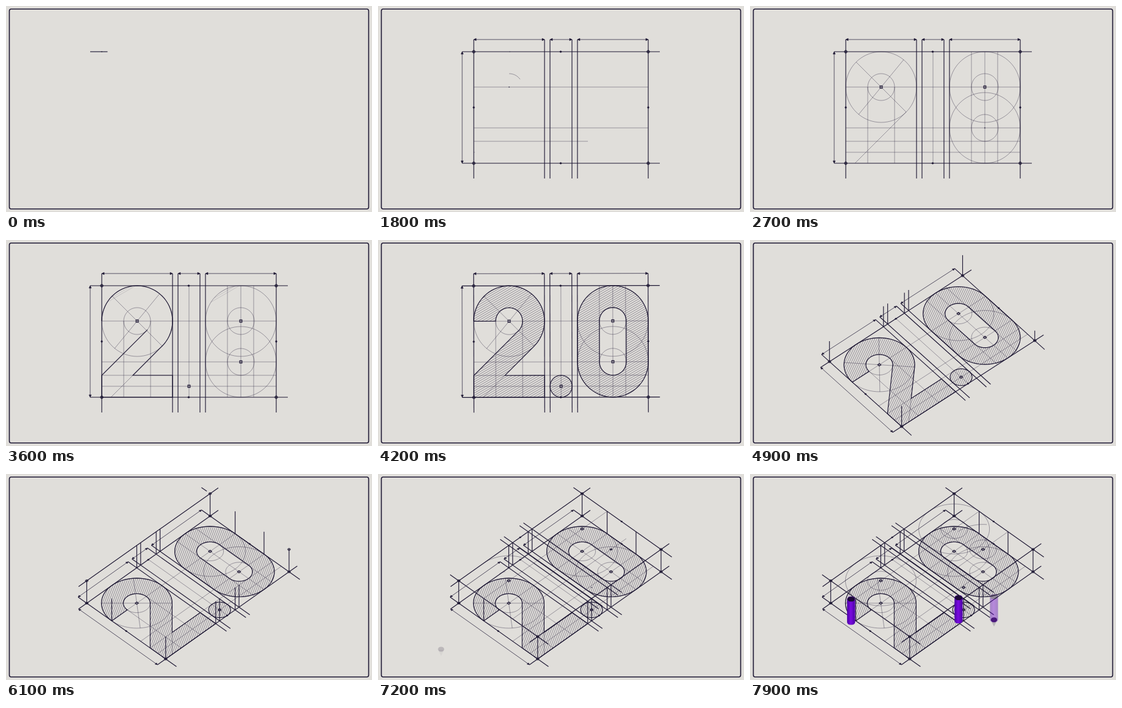
Animation, 600 px wide and 338 px high, one loop 8 s. Source, as an HTML page:

```html
<!DOCTYPE html>
<html lang="en">
<head>
<meta charset="utf-8">
<title>Blueprint 2.0</title>
<style>
  html, body { margin: 0; width: 100%; height: 100%; overflow: hidden; background: #e0deda; }
  svg { display: block; width: 100vw; height: 100vh; }
  path { fill: none; stroke: #1d1733; }
  .bold { stroke-width: 1.15; }
  .thin { stroke-width: .8; stroke-opacity: .48; }
  .dim { stroke-width: .85; stroke-opacity: .85; }
  .solid { fill: #1d1733; stroke-width: .5; }
  .ring { fill: #1d1733; fill-opacity: .6; stroke-width: 1; }
  .square { fill: #9b97a0; stroke-width: 1.15; }
  .hatch { stroke-width: .7; stroke-opacity: .6; vector-effect: non-scaling-stroke; }
</style>
</head>
<body>
<svg viewBox="0 0 600 338">
  <defs>
    <linearGradient id="tube">
      <stop offset="0" stop-color="#4a00a4"/>
      <stop offset=".45" stop-color="#7a0be0"/>
      <stop offset="1" stop-color="#4d00a8"/>
    </linearGradient>
  </defs>
  <rect x="5.5" y="5" width="589" height="328" rx="3" fill="none" stroke="#1d1733" stroke-width="1.6"/>
  <g id="thin"></g>
  <g id="hatch"></g>
  <g id="ink"></g>
  <g id="tubes"></g>
</svg>
<script>
const LOOP = 8000, HEIGHT = 52, RAD = Math.PI / 180;
const LEFT = 157, RIGHT = 443, TOP = 75, BOTTOM = 258;
const COLUMNS = [273, 282, 318, 327];
const layers = Object.fromEntries(['thin', 'hatch', 'ink', 'tubes'].map(id => [id, document.getElementById(id)]));

const clamp = v => Math.max(0, Math.min(1, v));
const ease = p => p < .5 ? 4 * p ** 3 : 1 - 4 * (1 - p) ** 3;
const progress = (t, start, dur) => ease(clamp((t - start) / dur));

function add(parent, tag, attrs) {
  const el = document.createElementNS('http://www.w3.org/2000/svg', tag);
  for (const key in attrs) el.setAttribute(key, attrs[key]);
  return parent.appendChild(el);
}

// Camera: turns about the vertical axis and tilts by the same angle.
let view;
function setView(t) {
  const p = progress(t, 4100, 1140), a = 45 * RAD * p;
  view = { c: Math.cos(a), s: Math.sin(a), cx: 300 - 1.8 * p * p, cy: 166.5 + 19.7 * p * p };
}
function project([x, y], z = 0) {
  const { c, s, cx, cy } = view, dx = x - 300, dy = y - 166.5;
  return [cx + c * dx + s * dy, cy + c * (c * dy - s * dx) - s * z];
}
function groundMatrix() {
  const { c, s, cx, cy } = view, d = c * c, b = -c * s;
  return `matrix(${c} ${b} ${s} ${d} ${cx - 300 * c - 166.5 * s} ${cy - 300 * b - 166.5 * d})`;
}
const toPath = pts => pts.length ? 'M' + pts.map(p => p.map(v => v.toFixed(2)).join(' ')).join('L') : '';

// Angles in degrees, 0 to the right, clockwise positive.
function arc(x, y, r, from, to) {
  const n = Math.ceil(Math.abs(to - from) / 5);
  return Array.from({ length: n + 1 }, (_, i) => {
    const a = (from + (to - from) * i / n) * RAD;
    return [x + r * Math.cos(a), y + r * Math.sin(a)];
  });
}
const circle = (x, y, r) => arc(x, y, r, -90, 270);
const row = (y, from = LEFT, to = RIGHT) => [[from, y], [to, y]];
const column = (x, from = TOP, to = BOTTOM) => [[x, from], [x, to]];
const stadium = r => [...arc(385, 133, r, -180, 0), ...arc(385, 200, r, 0, 180), [385 - r, 133]];

function partial(pts, p) {
  if (p <= 0) return [];
  if (p >= 1) return pts;
  const lengths = pts.slice(1).map((q, i) => Math.hypot(q[0] - pts[i][0], q[1] - pts[i][1]));
  let left = p * lengths.reduce((a, b) => a + b, 0);
  const out = [pts[0]];
  for (let i = 0; i < lengths.length; i++) {
    const k = lengths[i] ? Math.min(1, left / lengths[i]) : 1, a = pts[i], b = pts[i + 1];
    out.push([a[0] + (b[0] - a[0]) * k, a[1] + (b[1] - a[1]) * k]);
    left -= lengths[i];
    if (left <= 0) break;
  }
  return out;
}

const updates = [];
function stroke(cls, pts, start, dur = 450, z = 0) {
  const el = add(layers[cls === 'thin' ? 'thin' : 'ink'], 'path', { class: cls });
  updates.push(t => el.setAttribute('d', toPath(partial(pts, progress(t, start, dur)).map(p => project(p, z)))));
}
function mark(cls, x, y, shape, start, z = 0) {
  const el = add(layers.ink, 'path', { class: cls });
  updates.push(t => {
    const k = progress(t, start, 250);
    const pts = k ? shape.map(([dx, dy]) => project([x + dx * k, y + dy * k], z)) : [];
    el.setAttribute('d', pts.length ? toPath(pts) + 'Z' : '');
  });
}
function post(x, y, start, dur = 350) {
  const el = add(layers.ink, 'path', { class: 'bold' });
  updates.push(t => {
    const k = progress(t, start, dur);
    el.setAttribute('d', k ? toPath([project([x, y]), project([x, y], HEIGHT * k)]) : '');
  });
}
const dot = r => circle(0, 0, r);
const box = r => [[-r, -r], [r, -r], [r, r], [-r, r]];

function dimension(a, b, start) {
  stroke('dim', [a, b], start);
  const len = Math.hypot(b[0] - a[0], b[1] - a[1]), ux = (b[0] - a[0]) / len, uy = (b[1] - a[1]) / len;
  const head = s => [[0, 0], [s * ux * 4 - uy * 2, s * uy * 4 + ux * 2], [s * ux * 4 + uy * 2, s * uy * 4 - ux * 2]];
  mark('solid', ...a, head(1), start);
  mark('solid', ...b, head(-1), start + 250);
}

// Main frame
stroke('bold', row(TOP, 138, 462), -139, 500);
stroke('bold', column(LEFT, 55, 283), 100);
stroke('bold', column(RIGHT, 55, 283), 300);
stroke('bold', row(BOTTOM, 138, 462), 380);
COLUMNS.forEach((x, i) => stroke('bold', column(x, 55, 283), 420 + 70 * i));
[[LEFT, TOP, -70], [RIGHT, TOP, 250], [LEFT, BOTTOM, 450], [RIGHT, BOTTOM, 650]]
  .forEach(([x, y, t]) => mark('ring', x, y, dot(2.3), t));
[[299.5, TOP], [299.5, BOTTOM], [LEFT, 166.5], [RIGHT, 166.5]]
  .forEach(([x, y], i) => mark('solid', x, y, dot(1.4), 700 + 60 * i));

dimension([138, TOP], [138, BOTTOM], 850);
dimension([LEFT, 55], [273, 55], 950);
dimension([282, 55], [318, 55], 1050);
dimension([327, 55], [RIGHT, 55], 1150);

// Construction lines
[[133, 1150], [200, 1350], [222, 1550], [240, 1750]].forEach(([y, t]) => stroke('thin', row(y), t));
[[215, 133, 22], [215, 133, 58], [385, 133, 22], [385, 133, 58], [385, 200, 22], [385, 200, 58]]
  .forEach(([x, y, r], i) => stroke('thin', circle(x, y, r), 1650 + 100 * i));
stroke('thin', column(193, 133), 1950);
stroke('thin', column(237, 133), 2000);
[300, 363, 385, 406].forEach((x, i) => stroke('thin', column(x), 2000 + 70 * i));
stroke('thin', [[174, 92], [256, 174]], 2150);
stroke('thin', [[252, 88], [178, 178]], 2220);
stroke('thin', [[256, 174], [172, 258]], 2280);

[[215, 133, 1750], [385, 133, 2500], [385, 200, 2650], [300, 240, 2800]]
  .forEach(([x, y, t]) => mark('square', x, y, box(1.9), t));

// Glyph outlines and hatching
const two = [
  ...arc(215, 133, 58, -180, 45), [208, 222], [273, 222], [273, 258], [157, 258], [157, 222],
  ...arc(215, 133, 22, 45, -180), [157, 133]
];
const point = circle(300, 240, 18);
stroke('bold', two, 2900, 1060);
stroke('bold', stadium(58), 3600, 550);
stroke('bold', stadium(22), 3620, 500);
stroke('bold', point, 3650, 450);

function hatch(id, outlines, x0, y0, span, start, dur) {
  const group = add(layers.hatch, 'g');
  const clip = add(group, 'clipPath', { id });
  add(clip, 'path', { d: outlines.map(o => toPath(o) + 'Z').join(''), 'clip-rule': 'evenodd' });
  const lines = add(group, 'path', { class: 'hatch', 'clip-path': `url(#${id})` });
  updates.push(t => {
    group.setAttribute('transform', groundMatrix());
    group.setAttribute('opacity', clamp(1.6 * (t - start) / dur));
    const limit = span * progress(t, start, dur);
    let d = '';
    for (let u = 0; u < limit; u += 3.2) {
      const x = x0 + u * .5, y = y0 + u * .866;
      d += toPath([[x - 173.2, y + 100], [x + 173.2, y - 100]]);
    }
    lines.setAttribute('d', d);
  });
}
hatch('hatchTwo', [two], 186, 83, 205, 3450, 700);
hatch('hatchZero', [stadium(58), stadium(22)], 356, 83, 180, 3450, 700);
hatch('hatchPoint', [point], 291, 224.4, 37, 3700, 430);

// Posts joining the two planes
post(LEFT, TOP, 4520);
post(RIGHT, TOP, 4550);
post(LEFT, BOTTOM, 4550);
COLUMNS.forEach(x => post(x, TOP, 4540));
post(RIGHT, BOTTOM, 4728);
post(RIGHT, 133, 5300);
post(RIGHT, 200, 5400);
post(LEFT, 133, 5450);
COLUMNS.forEach((x, i) => post(x, BOTTOM, 5500 + 50 * i));

// Upper plane
const upper = (cls, pts, start, dur = 550) => stroke(cls, pts, start, dur, HEIGHT);
upper('bold', row(TOP, 138, 462), 5450, 550);
upper('bold', column(RIGHT, 55, 283), 5970);
upper('bold', row(BOTTOM, 138, 462), 6300);
upper('bold', column(LEFT, 55, 283), 6400);
COLUMNS.forEach((x, i) => upper('bold', column(x, 55, 283), 6500 + 60 * i));
[[133, 6700], [200, 6800]].forEach(([y, t]) => upper('thin', row(y), t));
[[215, 133, 58, 7000], [215, 133, 22, 7050], [385, 133, 58, 7250], [385, 133, 22, 7200], [385, 200, 22, 7350], [385, 200, 58, 7720]]
  .forEach(([x, y, r, t]) => upper('thin', circle(x, y, r), t));
[[LEFT, TOP, 5550], [RIGHT, TOP, 5800], [RIGHT, BOTTOM, 5850], [LEFT, BOTTOM, 6500]]
  .forEach(([x, y, t]) => mark('ring', x, y, dot(2.3), t, HEIGHT));
[[299.5, TOP, 6450], [RIGHT, 166.5, 6500]].forEach(([x, y, t]) => mark('solid', x, y, dot(1.4), t, HEIGHT));
[[215, 133], [385, 133], [385, 200], [300, 240]]
  .forEach(([x, y], i) => mark('square', x, y, box(1.9), 6900 + 80 * i, HEIGHT));

// Purple tubes sliding in along the plane
function tube(x, y, dx, dy, start) {
  const group = add(layers.tubes, 'g');
  const cone = add(group, 'path', { d: 'M-5 2L0 12L5 2Z', style: 'fill:#8c8794;stroke:none' });
  const base = add(group, 'ellipse', { cx: 0, cy: 1, rx: 5, ry: 4, fill: '#211032' });
  const body = add(group, 'g');
  add(body, 'rect', { x: -6.6, y: -41, width: 13.2, height: 46, rx: 4.5, fill: 'url(#tube)' });
  add(body, 'ellipse', { cx: 0, cy: -37, rx: 6.2, ry: 4, fill: '#1c0838' });
  updates.push(t => {
    const age = t - start, k = progress(t, start, 1000);
    const [sx, sy] = project([x + dx * k, y + dy * k]);
    const seen = clamp(age / 250);
    group.setAttribute('transform', `translate(${sx.toFixed(2)} ${sy.toFixed(2)})`);
    base.setAttribute('opacity', seen * .9);
    cone.setAttribute('opacity', seen * .5 * clamp((750 - age) / 250));
    body.setAttribute('opacity', clamp((age - 375) / 265));
  });
}
tube(62, 129, 94, 0, 7150);
tube(277, 355, 0, -125, 7250);
tube(320, 355, 0, -145, 7420);

function draw(t) {
  setView(t);
  updates.forEach(update => update(t));
}
const origin = performance.now();
function tick() {
  draw((performance.now() - origin) % LOOP);
  requestAnimationFrame(tick);
}
tick();
</script>
</body>
</html>
```
